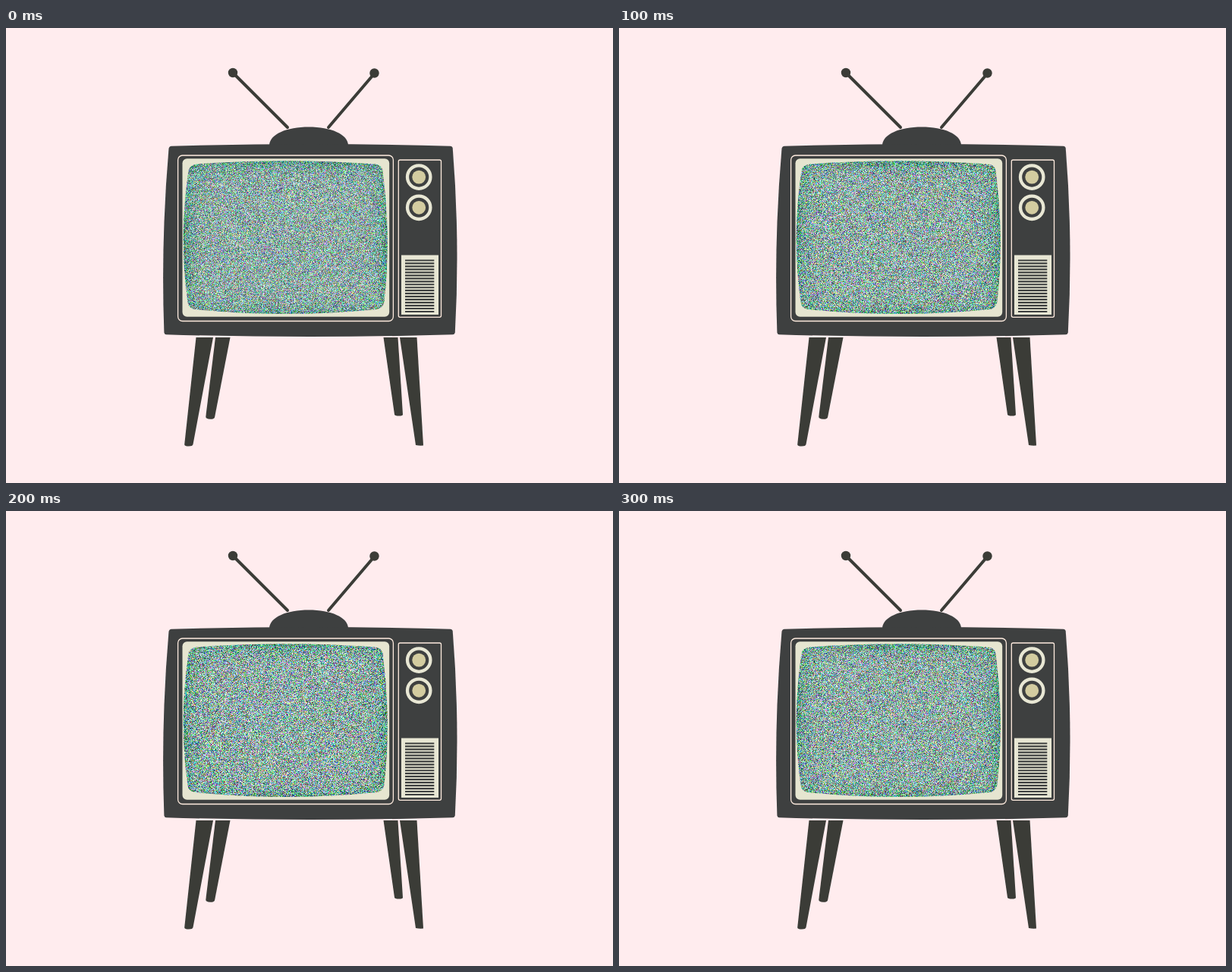
Animation, 800 px wide and 600 px high, one loop 0.4 s. Source, as an HTML page with a canvas:

```html
<!DOCTYPE html>
<html lang="en">
<head>
<meta charset="utf-8">
<title>Television static</title>
<style>
  html, body { margin: 0; width: 100%; height: 100%; overflow: hidden; background: #ffecee; }
  svg, canvas { position: absolute; left: 0; top: 0; width: 800px; height: 600px; }
  canvas {
    clip-path: path("M251 179.5 Q368 171 487 179.5 Q495 180.5 496.500 188 Q508 276 498.500 361 Q497 369 489 371 Q368 383 249 371 Q241 370 239.500 362 Q227.500 276 240.500 188 Q242.500 180.500 251 179.500 Z");
  }
</style>
</head>
<body>
<svg viewBox="0 0 800 600">
  <g fill="#3b3c37">
    <path d="M250.500 408H273L246.500 549Q246 551.500 241 551.500Q235 551.500 235.200 549Z"/>
    <path d="M276 408H295.500L275 513.500Q274 516 269 515.800Q263 515.500 263.300 512.500Z"/>
    <path d="M497.500 408H516.500L523 509.500Q523 511.500 518 511.500Q512.300 511.500 512 509.500Z"/>
    <path d="M519 408H541.500L550 550.500Q545 551 540 550Z"/>
    <path d="M299 59L371 131M485.500 60L425 131" fill="none" stroke="#3b3c37" stroke-width="4" stroke-linecap="round"/>
    <circle cx="299" cy="59" r="6.200"/>
    <circle cx="485.500" cy="59.500" r="6.200"/>
  </g>
  <g fill="#3e4040">
    <path d="M347 155C347 140 370 130.500 399 130.500S451 140 451 155Z"/>
    <path d="M218 155.700Q400 150.300 586 155.700Q588.200 155.900 588.700 158Q598.500 280 591.800 401.500Q591.500 404 589 404.200Q400 410 211 404.200Q208.700 404 208.400 401.500Q204 280 214.500 159Q215 156 218 155.700Z"/>
  </g>
  <g fill="none" stroke="#ffecdf" stroke-width="1.300">
    <rect x="226.600" y="168" width="283.800" height="218.500" rx="6"/>
    <rect x="517.300" y="174" width="56.200" height="207.300" rx="2"/>
  </g>
  <rect x="232.500" y="172.300" width="272.700" height="208.400" rx="6" fill="#e6e5d0"/>
  <g id="knob">
    <circle cx="544.200" cy="196.600" r="15.200" fill="#3e4040" stroke="#e8e7d4" stroke-width="4.300"/>
    <circle cx="544.200" cy="196.600" r="8.900" fill="#d3cca0"/>
  </g>
  <use href="#knob" y="40.200"/>
  <rect x="521" y="299.500" width="49" height="78.500" fill="#e8e7d4"/>
  <path id="grille" stroke="#3e4040" stroke-width="2.200"/>
</svg>
<canvas id="screen" width="800" height="600"></canvas>
<script>
  const grille = Array.from({ length: 18 }, (_, i) => `M526 ${306.5 + i * 3.97}h38.300`);
  document.getElementById('grille').setAttribute('d', grille.join(''));

  const BOX = { x: 230, y: 173, w: 276, h: 207 };
  const CENTRE = [142, 172, 166];
  const EDGE = [66, 142, 118];
  const ctx = document.getElementById('screen').getContext('2d');

  function randomFrom(seed) {
    return () => {
      seed = (seed + 0x6D2B79F5) | 0;
      let t = Math.imul(seed ^ (seed >>> 15), 1 | seed);
      t = (t + Math.imul(t ^ (t >>> 7), 61 | t)) ^ t;
      return ((t ^ (t >>> 14)) >>> 0) / 4294967296;
    };
  }

  // Coloured static that turns darker and greener towards the rim.
  function makeStatic(seed, contrast) {
    const random = randomFrom(seed);
    const image = ctx.createImageData(BOX.w, BOX.h);
    let p = 0;
    for (let y = 0; y < BOX.h; y++) {
      for (let x = 0; x < BOX.w; x++) {
        const u = Math.abs(2 * x / BOX.w - 1);
        const v = Math.abs(2 * y / BOX.h - 1);
        const rim = Math.min(1, u ** 12 + v ** 12);
        const light = random() - 0.5;
        for (let c = 0; c < 3; c++) {
          const mean = CENTRE[c] + (EDGE[c] - CENTRE[c]) * rim;
          image.data[p++] = mean + contrast * (0.5 * light + 0.75 * (random() - 0.5));
        }
        image.data[p++] = 255;
      }
    }
    return image;
  }

  const fields = [makeStatic(11, 190), makeStatic(23, 210), makeStatic(37, 225)];
  const order = [0, 1, 2, 1];
  const start = performance.now();
  let shown = -1;

  function draw() {
    const step = Math.floor((performance.now() - start) / 100) % order.length;
    if (step !== shown) {
      ctx.putImageData(fields[order[step]], BOX.x, BOX.y);
      shown = step;
    }
    requestAnimationFrame(draw);
  }
  draw();
</script>
</body>
</html>
```
